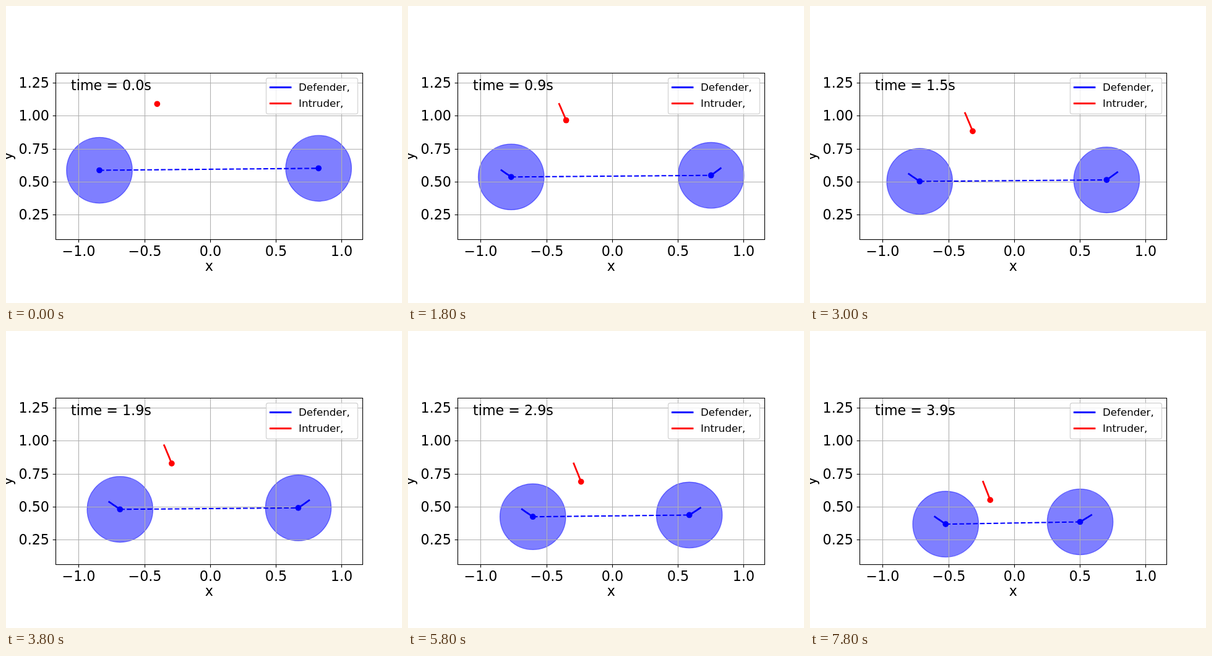
Write an HTML page that moves like this. It is 640 px wide and 480 px high and loops after 8000 ms.

```html
<!DOCTYPE html>
<html lang="en">
<head>
<meta charset="utf-8">
<title>Defenders and intruder</title>
<style>
  html, body { margin: 0; width: 100%; height: 100%; overflow: hidden; background: #fff; }
  svg { display: block; width: 640px; height: 480px; }
  text { font: 22.22px "DejaVu Sans", sans-serif; white-space: pre; }
  .legend text { font-size: 16.67px; }
  .grid { stroke: #b0b0b0; stroke-width: 1.11; }
  .axis { stroke: #000; stroke-width: 1.11; fill: none; }
  .trail { stroke-width: 2.78; stroke-linecap: square; stroke-linejoin: round; fill: none; }
  .zone { fill: #00f; stroke: #00f; stroke-width: 1.39; fill-opacity: .5; stroke-opacity: .5; }
  .link { stroke: #00f; stroke-width: 2.08; stroke-dasharray: 7.71 3.33; }
</style>
</head>
<body>
<svg viewBox="0 0 640 480">
  <g id="zones"></g>
  <g id="axes"></g>
  <rect class="axis" x="80.5" y="108.5" width="496" height="269"/>
  <g id="movers"></g>
  <text id="clock" x="105" y="136"></text>
  <text x="328.3" y="428" text-anchor="middle">x</text>
  <text transform="translate(9.5 242.7) rotate(-90)" text-anchor="middle">y</text>
  <g class="legend">
    <rect x="420.5" y="116.5" width="148" height="58" rx="3.3" fill="#fff" fill-opacity=".8"
          stroke="#ccc" stroke-opacity=".8" stroke-width="1.39"/>
    <path class="trail" stroke="#00f" d="M427.3 131.5H460"/>
    <path class="trail" stroke="#f00" d="M427.3 157.5H460"/>
    <text x="473" y="137">Defender, </text>
    <text x="473" y="163">Intruder, </text>
  </g>
</svg>
<script>
const STEP_MS = 200, STEPS = 40, TRAIL_STEPS = 10;
const byId = id => document.getElementById(id);

function set(node, attrs) {
  for (const key in attrs) node.setAttribute(key, attrs[key]);
  return node;
}

function add(parent, tag, attrs, label) {
  const node = set(document.createElementNS('http://www.w3.org/2000/svg', tag), attrs);
  if (label) node.textContent = label;
  return parent.appendChild(node);
}

// Grid, ticks and tick labels
const axes = byId('axes');
[117.5, 224.5, 330.5, 436.5, 542.5].forEach((x, i) => {
  const label = ((i - 2) / 2).toFixed(1).replace('-', '\u2212');
  add(axes, 'path', { class: 'grid', d: `M${x} 108.5V377.5` });
  add(axes, 'path', { class: 'axis', d: `M${x} 377.5v4.86` });
  add(axes, 'text', { x, y: 403.5, 'text-anchor': 'middle' }, label);
});
[337.5, 284.5, 231.5, 177.5, 124.5].forEach((y, i) => {
  add(axes, 'path', { class: 'grid', d: `M80.5 ${y}H576.5` });
  add(axes, 'path', { class: 'axis', d: `M80.5 ${y}h-4.86` });
  add(axes, 'text', { x: 70, y: y + 7.5, 'text-anchor': 'end' }, ((i + 1) / 4).toFixed(2));
});

// Each coordinate is a polynomial in the step: start, velocity, curvature
const at = ([start, velocity, bend], n) => start + velocity * n + bend * n * n;
const movers = byId('movers');
const link = add(movers, 'path', { class: 'link' });

function makeAgent(color, x, y, guarded) {
  return {
    point: n => [at(x, n), at(y, n)],
    zone: guarded && add(byId('zones'), 'circle', { class: 'zone', r: 53.15 }),
    trail: add(movers, 'path', { class: 'trail', stroke: color }),
    dot: add(movers, 'circle', { r: 4.86, fill: color })
  };
}

const left = makeAgent('#00f', [151, 1.751, 0], [265.5, 1.197, 0], true);
const right = makeAgent('#00f', [505.2, -1.69, -.0018], [262.3, 1.29, -.0027], true);
const intruder = makeAgent('#f00', [244.3, 1.27, -.0017], [158.3, 2.93, .0004], false);

function place(agent, n) {
  const [cx, cy] = agent.point(n);
  set(agent.dot, { cx, cy });
  if (agent.zone) set(agent.zone, { cx, cy });
  const points = [];
  for (let i = Math.max(0, n - TRAIL_STEPS); i <= n; i++) points.push(agent.point(i));
  set(agent.trail, { d: 'M' + points.join('L') });
}

function draw(n) {
  [left, right, intruder].forEach(agent => place(agent, n));
  set(link, { d: `M${left.point(n)}L${right.point(n)}` });
  byId('clock').textContent = `time = ${(n / 10).toFixed(1)}s`;
}

let begin, shown;
function tick(now) {
  begin ??= now;
  const n = Math.floor((now - begin) / STEP_MS) % STEPS;
  if (n !== shown) draw(shown = n);
  requestAnimationFrame(tick);
}
draw(0);
requestAnimationFrame(tick);
</script>
</body>
</html>
```
